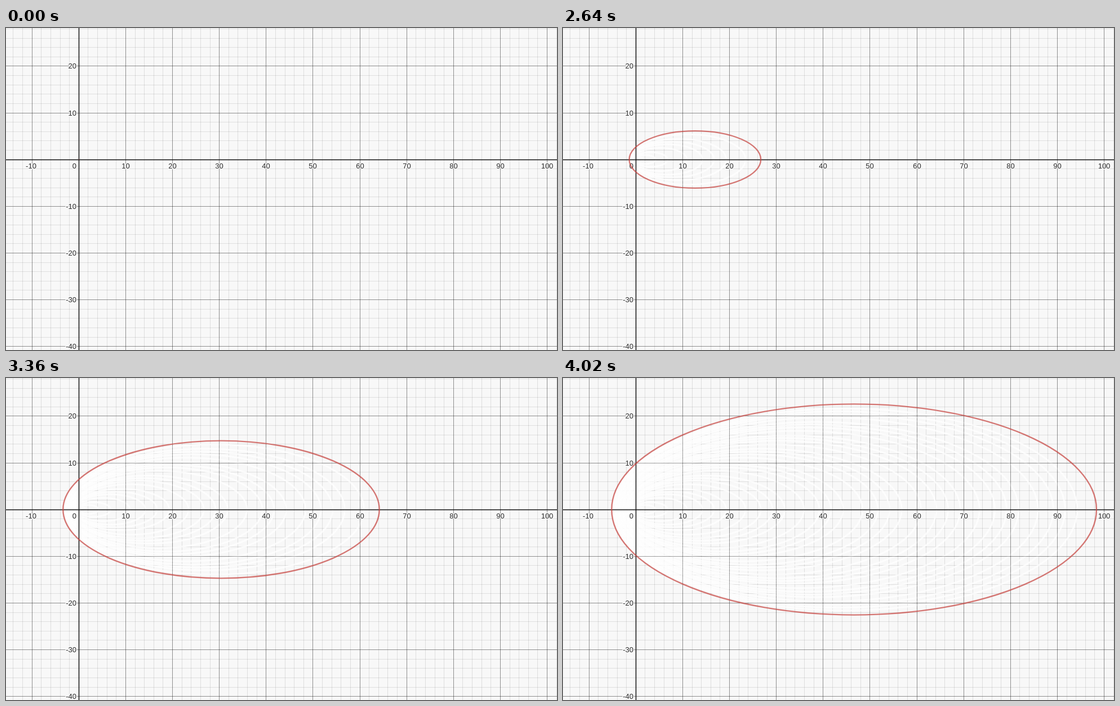
An HTML page with a canvas that plays this animation: 978 by 573 pixels, repeating every 4.08 s.

```html
<!DOCTYPE html>
<html lang="en">
<head>
<meta charset="utf-8">
<title>Growing ellipse</title>
<style>
html, body { margin: 0; width: 100%; height: 100%; overflow: hidden; background: #f8f8f8; }
canvas { display: block; width: 978px; height: 573px; }
</style>
</head>
<body>
<canvas id="stage" width="978" height="573"></canvas>
<script>
const W = 978, H = 573;
const LOOP = 4080, HOLD = 2160, STEP = 60;
const UNIT = 8.313, X0 = 129.3, Y0 = 234.2;
const PAPER = '#f8f8f8';
// The curve advances unevenly, repeating every four steps.
const LEAD = [0.55, 0.35, 0.18, 0.5];

const ctx = document.getElementById('stage').getContext('2d');
const px = v => Math.floor(X0 + UNIT * v);
const py = v => Math.floor(Y0 - UNIT * v);

function makeLayer(paint) {
  const layer = document.createElement('canvas');
  layer.width = W;
  layer.height = H;
  paint(layer.getContext('2d'));
  return layer;
}

function gridLines(g, step, color) {
  g.fillStyle = color;
  for (let v = -20; v <= 104; v += step) g.fillRect(px(v), 0, 1, H);
  for (let v = -40; v <= 30; v += step) g.fillRect(0, py(v), W, 1);
}

function label(g, text, x, y, align) {
  g.textAlign = align;
  g.strokeText(text, x, y);
  g.fillText(text, x, y);
}

const back = makeLayer(g => {
  g.fillStyle = PAPER;
  g.fillRect(0, 0, W, H);
  gridLines(g, 2, 'rgba(0,0,0,0.1)');
});

const front = makeLayer(g => {
  gridLines(g, 10, 'rgba(0,0,0,0.36)');
  g.fillStyle = '#111';
  g.fillRect(px(0) - 0.25, 0, 1.5, H);
  g.fillRect(0, py(0) - 0.25, W, 1.5);

  g.font = '13px "Liberation Sans", Arial, sans-serif';
  g.fillStyle = '#2b2b2b';
  g.strokeStyle = PAPER;
  g.lineWidth = 3;
  g.lineJoin = 'round';
  for (let v = -10; v <= 100; v += 10) {
    if (v === 0) label(g, '0', 125, 249.5, 'right');
    else label(g, String(v), px(v) + (v < 0 ? -1.5 : 0.5), 249.5, 'center');
  }
  for (let v = -40; v <= 20; v += 10) {
    if (v !== 0) label(g, String(v), 125, py(v) + 4.5, 'right');
  }
});

function ring(size, color, width) {
  ctx.beginPath();
  ctx.ellipse(129.2 + 12.3 * size, 234, 13.66 * size, 5.955 * size, 0, 0, Math.PI * 2);
  ctx.strokeStyle = color;
  ctx.lineWidth = width;
  ctx.stroke();
}

const sizeAt = k => k + LEAD[k % 4];

function draw(t) {
  const k = Math.floor((t - HOLD) / STEP);
  ctx.drawImage(back, 0, 0);
  for (let i = 0; i < k; i++) ring(sizeAt(i), 'rgba(255,255,255,0.75)', 3);
  ctx.drawImage(front, 0, 0);
  if (k >= 0) ring(sizeAt(k), 'rgba(199,68,64,0.72)', 2.4);
  else ring(0.04, 'rgba(199,68,64,0.4)', 1);
}

function tick() {
  draw(performance.now() % LOOP);
  requestAnimationFrame(tick);
}
tick();
</script>
</body>
</html>
```
